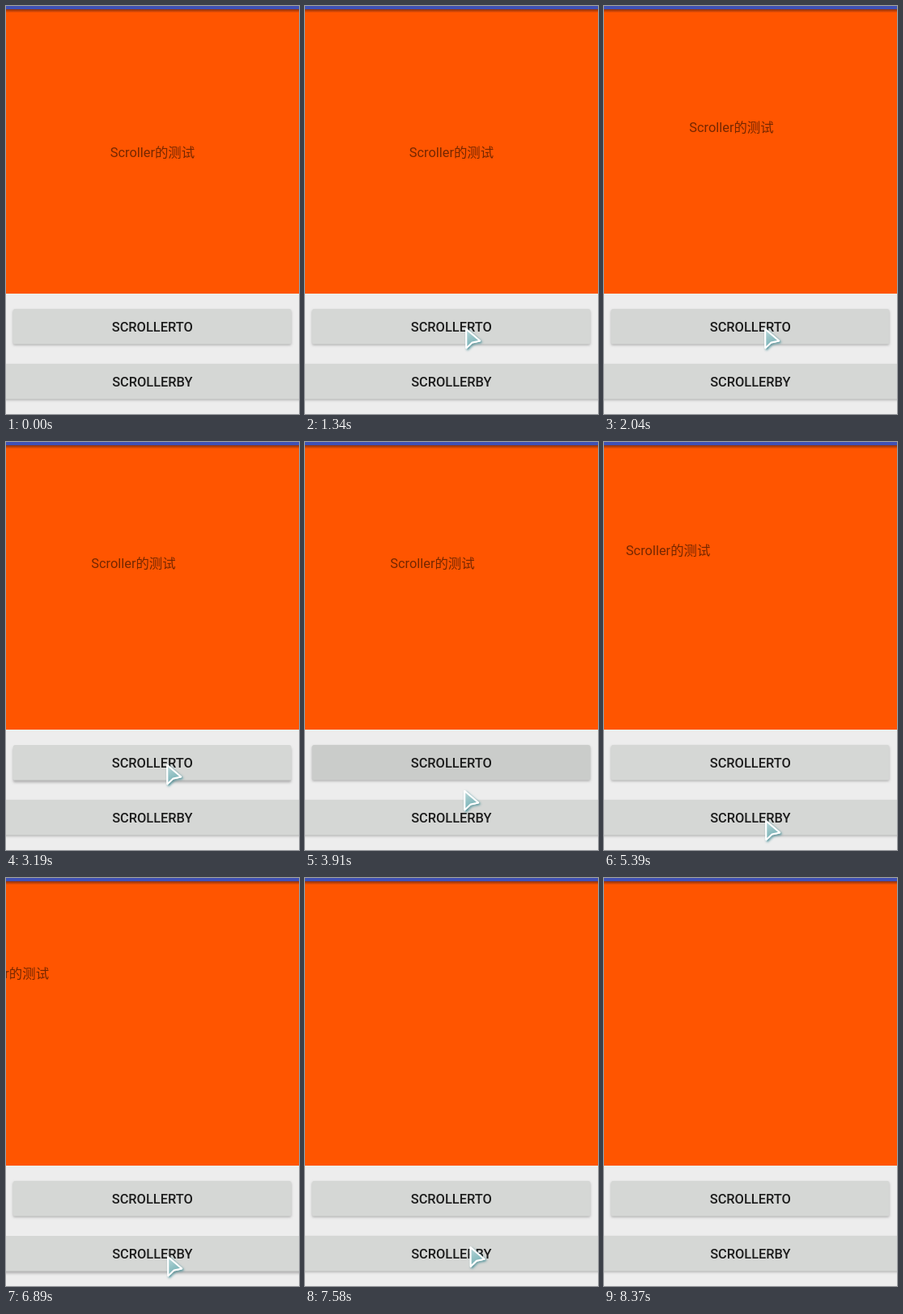
An HTML page with a canvas that plays this animation: 362x505 px, repeating every 9.36 s.

```html
<!DOCTYPE html>
<html lang="zh-CN">
<head>
<meta charset="utf-8">
<title>Scroller</title>
<style>
html, body { margin: 0; width: 100%; height: 100%; overflow: hidden; background: #ededed; }
canvas { display: block; }
</style>
</head>
<body>
<canvas id="stage" width="362" height="505"></canvas>
<script>
const ctx = document.getElementById('stage').getContext('2d');
const FAMILY = "Roboto, 'Noto Sans CJK SC', 'Noto Sans CJK JP', sans-serif";
const LOOP = 9360;
const TICK = 130;          // pointer positions are sampled this often
const CLICK_DELAY = 150;   // from touching a button to its action
const SCALE = 0.783;       // screen pixels per scroll unit

const toTaps = [1770];
const byTaps = [4850, 5790, 6860];
const hold = { start: 3190, drop: 3760, leave: 3910, end: 4150 };

// Each glide runs through its points, spending `ticks` ticks on every leg.
const glides = [
  { start: 560, ticks: 2, points: [[340, 487], [253, 425], [222, 413], [197, 398]] },
  { start: 3610, ticks: 2, points: [[196, 398], [195, 430], [197, 459], [198, 467]] },
  { start: 7430, ticks: 3, points: [[198, 467], [211, 432]] },
  { start: 8000, ticks: 2, points: [[211, 432], [253, 488]] }
];
const POINTER_GONE = 8370;

const clamp = v => Math.min(1, Math.max(0, v));
const mix = (a, b, p) => a + (b - a) * p;

function pointerAt(time) {
  const glide = glides.filter(g => g.start <= time).pop();
  if (!glide || time >= POINTER_GONE) return null;
  const { start, ticks, points } = glide;
  const last = points.length - 1;
  const travel = Math.min(last, Math.floor((time - start) / TICK) / ticks);
  const leg = Math.min(last - 1, Math.floor(travel));
  return points[leg].map((v, i) => mix(v, points[leg + 1][i], travel - leg));
}

function scrollAt(time) {
  const done = taps => taps.filter(t => t + CLICK_DELAY <= time).length;
  const to = done(toTaps), by = done(byTaps);
  return [-SCALE * (30 * to + 100 * by), -SCALE * (40 * to + 20 * by)];
}

function tapState(taps, time) {
  const age = time - taps.filter(t => t <= time).pop();
  const fade = clamp(1 - (age - CLICK_DELAY) / 150);
  return { lifted: age < 270, ripple: age >= CLICK_DELAY ? 0.6 * fade : 0 };
}

function holdState(time) {
  const grow = clamp((time - hold.start) / 500);
  const fade = clamp((hold.end - time) / (hold.end - hold.leave));
  return { lifted: time < hold.drop, ripple: grow * fade };
}

function setShadow(color = 'transparent', blur = 0, y = 0, x = 0) {
  ctx.shadowColor = color;
  ctx.shadowBlur = blur;
  ctx.shadowOffsetX = x;
  ctx.shadowOffsetY = y;
}

function drawText(text, x, y, weight, alpha) {
  ctx.font = `${weight} 16.4px ${FAMILY}`;
  ctx.textAlign = 'center';
  ctx.fillStyle = `rgba(0,0,0,${alpha})`;
  ctx.fillText(text, x, y);
}

function drawButton(label, x, y, width, { lifted, ripple }) {
  const shade = base => Math.round(base - 11 * ripple);
  ctx.fillStyle = `rgb(${shade(213)},${shade(215)},${shade(213)})`;
  setShadow('rgba(0,0,0,.24)', 3, lifted ? 3 : 1.6);
  ctx.beginPath();
  ctx.roundRect(x, y, width, 43.5, 2.6);
  ctx.fill();
  setShadow();
  drawText(label, 180.8, y + 28, 500, 0.87);
}

function drawPointer(x, y) {
  ctx.save();
  ctx.translate(x, y);
  const fill = ctx.createLinearGradient(3, 4, 12, 22);
  fill.addColorStop(0, '#b4d4d6');
  fill.addColorStop(1, '#78b2b6');
  ctx.beginPath();
  ctx.moveTo(2.2, 2);
  ctx.lineTo(19.2, 16.4);
  ctx.lineTo(9.6, 18.4);
  ctx.lineTo(2.4, 25.4);
  ctx.closePath();
  ctx.lineJoin = 'round';
  ctx.lineWidth = 2;
  ctx.strokeStyle = '#fff';
  setShadow('rgba(30,120,130,.85)', 3, 1.6, 1.4);
  ctx.stroke();
  setShadow();
  ctx.fillStyle = fill;
  ctx.fill();
  ctx.stroke();
  ctx.restore();
}

function drawPanel(time) {
  ctx.fillStyle = '#ff5500';
  ctx.fillRect(0, 0, 362, 356);
  const [dx, dy] = scrollAt(time);
  drawText('Scroller的测试', 180.9 + dx, 187 + dy, 400, 0.54);

  const shade = ctx.createLinearGradient(0, 4, 0, 8.5);
  shade.addColorStop(0, 'rgba(40,20,30,.55)');
  shade.addColorStop(1, 'rgba(40,20,30,0)');
  ctx.fillStyle = shade;
  ctx.fillRect(0, 4, 362, 5);
  ctx.fillStyle = '#3f51b5';
  ctx.fillRect(0, 0, 362, 4);
}

function render(now) {
  const time = now % LOOP;
  ctx.fillStyle = '#ededed';
  ctx.fillRect(0, 0, 362, 505);
  drawPanel(time);
  const toState = time < hold.start ? tapState(toTaps, time) : holdState(time);
  drawButton('SCROLLERTO', 8.7, 375, 343.8, toState);
  drawButton('SCROLLERBY', -8, 443, 378, tapState(byTaps, time));
  const position = pointerAt(time);
  if (position) drawPointer(...position);
}

const start = performance.now();
function tick() {
  render(performance.now() - start);
  requestAnimationFrame(tick);
}
tick();
</script>
</body>
</html>
```
